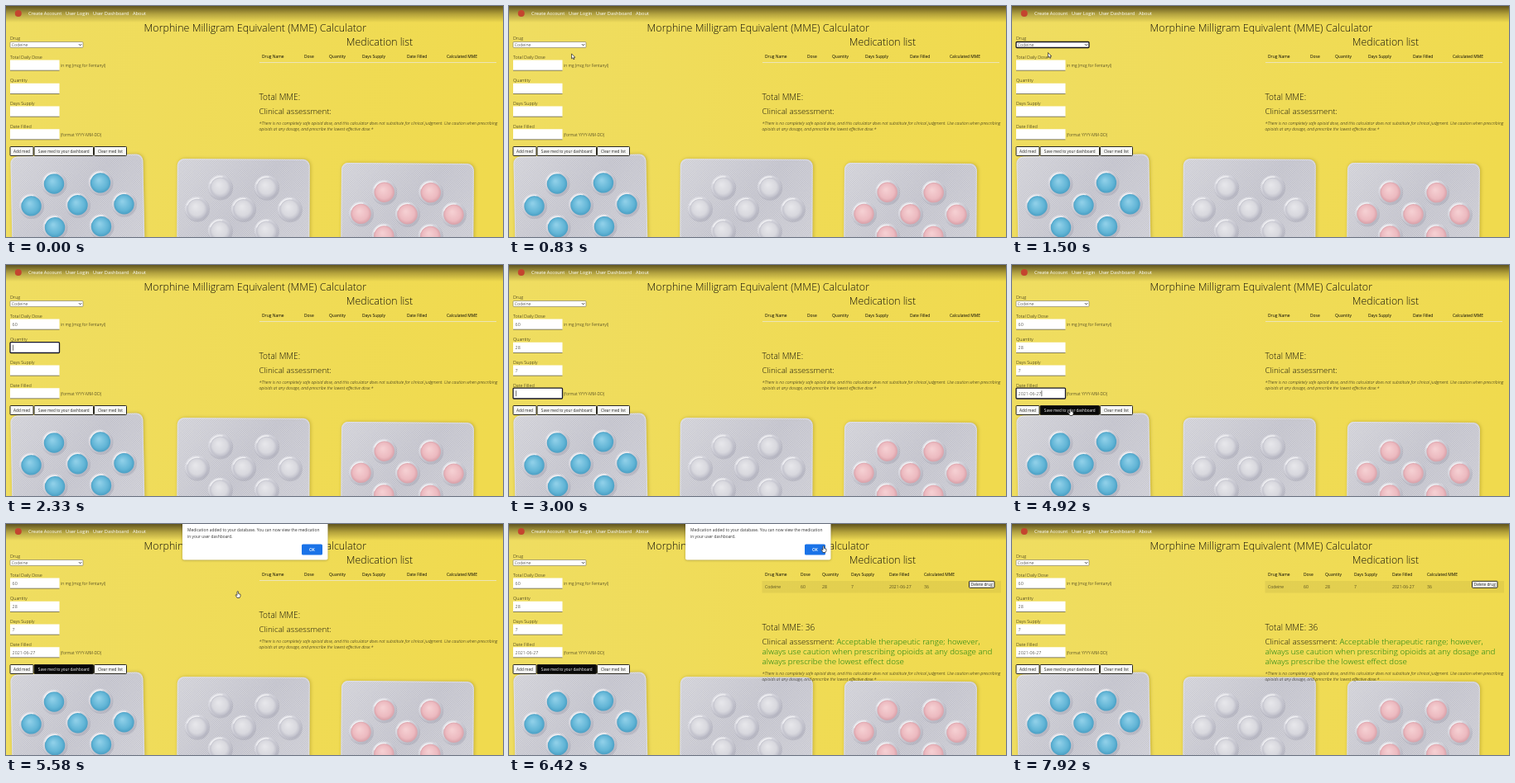
Recreate the animation shown at these times as an HTML page with a canvas. Size 600 px wide and 280 px high, loop 8 s.

```html
<!DOCTYPE html>
<html lang="en">
<head>
<meta charset="utf-8">
<title>MME calculator demo</title>
<style>
html, body { margin: 0; width: 100%; height: 100%; overflow: hidden; background: #efdb56; }
canvas { display: block; width: 600px; height: 280px; }
</style>
</head>
<body>
<canvas id="stage" width="600" height="280"></canvas>
<script>
const LOOP = 8000, W = 600, H = 280;
const stage = document.getElementById('stage').getContext('2d');
let g = stage;

const SANS = '"Open Sans", "Noto Sans", sans-serif';
const INK = '#14120a';

// Type is set ten times larger and scaled down, so small sizes keep exact spacing.
function text(str, x, y, size, { color = INK, weight = 300, align = 'left', italic = '' } = {}) {
  g.save();
  g.translate(x, y);
  g.scale(0.1, 0.1);
  g.font = `${italic} ${weight} ${size * 10}px ${SANS}`;
  g.fillStyle = color;
  g.textAlign = align;
  g.fillText(str, 0, 0);
  const width = g.measureText(str).width / 10;
  g.restore();
  return width;
}

function box(x, y, w, h, fill, stroke, line = 1, radius = 0) {
  g.beginPath();
  g.roundRect(x, y, w, h, radius);
  if (fill) { g.fillStyle = fill; g.fill(); }
  if (stroke) { g.strokeStyle = stroke; g.lineWidth = line; g.stroke(); }
}

function disc(x, y, r, fill) {
  g.beginPath();
  g.arc(x, y, r, 0, 7);
  g.fillStyle = fill;
  g.fill();
}

function linear(x0, y0, x1, y1, ...colors) {
  const grad = g.createLinearGradient(x0, y0, x1, y1);
  colors.forEach((c, i) => grad.addColorStop(i / (colors.length - 1), c));
  return grad;
}

function pill(x, y, [light, mid, dark]) {
  disc(x + 0.5, y + 1, 15, 'rgba(90,90,115,.15)');
  disc(x, y, 14.6, linear(x - 10, y - 12, x + 10, y + 12, '#e2e2e8', '#c9c9d2', '#b4b4c0'));
  const body = g.createRadialGradient(x - 2, y - 3, 1, x, y, 12.5);
  body.addColorStop(0, light);
  body.addColorStop(0.7, mid);
  body.addColorStop(1, dark);
  disc(x, y + 0.3, 12.2, body);
  g.lineCap = 'round';
  g.lineWidth = 1.2;
  g.strokeStyle = 'rgba(255,255,255,.65)';
  g.beginPath();
  g.arc(x, y, 12.6, 3.5, 4.9);
  g.stroke();
}

function blister(cx, cy, top, tilt, colors) {
  g.save();
  g.translate(cx, cy);
  g.rotate(tilt);
  g.shadowColor = 'rgba(110,90,0,.35)';
  g.shadowBlur = 4;
  g.shadowOffsetX = 1;
  box(-80, top, 160, 150, linear(-80, top, 80, 60, '#d6d6dc', '#c6c6cf', '#d2d2d9'), null, 0, 8);
  g.shadowColor = 'transparent';
  g.save();
  g.clip();
  g.lineWidth = 0.7;
  for (let x = -180; x < 180; x += 2.6) {
    g.strokeStyle = 'rgba(255,255,255,.32)';
    g.beginPath(); g.moveTo(x, top); g.lineTo(x + 100, top + 100); g.stroke();
    g.strokeStyle = 'rgba(110,110,130,.18)';
    g.beginPath(); g.moveTo(x, top); g.lineTo(x - 100, top + 100); g.stroke();
  }
  g.restore();
  box(-79.4, top + 0.6, 158.8, 150, null, 'rgba(235,235,240,.6)', 1, 8);
  for (const [col, row] of [[-1, -1], [1, -1], [-2, 0], [0, 0], [2, 0], [-1, 1], [1, 1]])
    pill(col * 28, row * 26.4, colors);
  g.restore();
}

function makeBackdrop() {
  const canvas = document.createElement('canvas');
  canvas.width = W;
  canvas.height = H;
  g = canvas.getContext('2d');
  g.fillStyle = linear(0, 0, W, 120, '#efdd61', '#f0da4e');
  g.fillRect(0, 0, W, H);
  blister(86.5, 241, -60, -0.02, ['#8ecfe8', '#62b5d6', '#4a9fc4']);
  blister(286.5, 246, -60.5, 0.005, ['#e6e6ea', '#d8d8de', '#bfbfca']);
  blister(484.5, 252, -61.5, 0.008, ['#f5cfd2', '#ecbac0', '#d9a0a8']);
  g.fillStyle = linear(0, 0, 0, 20, 'rgba(45,35,8,.74)', 'rgba(60,48,10,.33)', 'rgba(60,48,10,0)');
  g.fillRect(0, 0, W, 20);
  g = stage;
  return canvas;
}

const backdrop = makeBackdrop();

// Each field shows the characters whose key times have passed.
const fields = [
  { label: 'Total Daily Dose', y: 65.5, note: 'in mg (mcg for Fentanyl)', value: '60', start: 1900, step: 110, focus: [1720, 2200] },
  { label: 'Quantity', y: 93.7, value: '28', start: 2340, step: 110, focus: [2200, 2600] },
  { label: 'Days Supply', y: 121.5, value: '7', start: 2740, step: 110, focus: [2600, 2900] },
  { label: 'Date Filled', y: 149.2, note: '(format YYYY-MM-DD)', value: '2021-06-27', start: 3100, step: 130, focus: [2900, 5250] }
];
const SAVE_HOVER = 4900, DIALOG_OPEN = 5300, ROW_ADDED = 5960, DIALOG_CLOSE = 6620;

const within = (t, a, b) => t >= a && t < b;

function drawField({ label, y, note, value, start, step, focus }, t) {
  text(label, 5, y - 1.6, 5.45);
  const count = t < start ? 0 : Math.floor((t - start) / step) + 1;
  const focused = within(t, ...focus);
  box(5, y, 59.5, 12.8, '#fff', focused && '#16162a', 1.3, focused ? 1 : 0);
  if (!focused) box(5, y + 12.2, 59.5, 0.8, '#5c573c');
  const width = text(value.slice(0, count), 7.6, y + 8.4, 5.3);
  if (focused && (t - focus[0]) % 1000 < 500) box(8 + width, y + 3, 0.6, 7, '#111');
  if (note) text(note, 66, y + 8.4, 5.05);
}

function button(label, x, y, w, h, size, fill = '#f7f7f5', color = '#222') {
  box(x, y, w, h, fill, '#2a281e', 1, 0.8);
  text(label, x + w / 2, y + h / 2 + size * 0.36, size, { color, weight: 400, align: 'center' });
}

function drawForm(t) {
  text('Drug', 5, 41.3, 5.45);
  const focused = within(t, 1000, 1720);
  box(5, 43.5, 88, 7, '#fff', focused ? '#15151f' : '#77735c', focused ? 1.3 : 0.6, 1);
  text('Codeine', 6.8, 49, 5.3);
  g.strokeStyle = '#222';
  g.lineWidth = 0.9;
  g.beginPath();
  g.moveTo(88, 46.2); g.lineTo(89.6, 47.8); g.lineTo(91.2, 46.2);
  g.stroke();
  fields.forEach(f => drawField(f, t));
  const hover = within(t, SAVE_HOVER, DIALOG_CLOSE);
  button('Add med', 5, 170.5, 28, 11, 4.7);
  button('Save med to your dashboard', 34, 170.5, 71.5, 11, 4.6, hover ? '#080808' : undefined, hover ? '#fff' : undefined);
  button('Clear med list', 106.5, 170.5, 39, 11, 4.7);
}

const headings = ['Drug Name', 'Dose', 'Quantity', 'Days Supply', 'Date Filled', 'Calculated MME'];
const emptyColumns = [309, 360, 390, 430, 484, 532];
const filledColumns = [309, 352, 378, 413, 459, 501];
const row = ['Codeine', '60', '28', '7', '2021-06-27', '36'];

function drawResults(added) {
  const columns = added ? filledColumns : emptyColumns;
  text('Medication list', 451, 48.2, 12.4, { align: 'center' });
  headings.forEach((h, i) => text(h, columns[i], 63, 4.95, { weight: 400, color: '#000' }));
  if (added) {
    box(305.5, 69, 288.5, 14.5, 'rgba(0,0,0,.055)');
    row.forEach((v, i) => text(v, columns[i], 78.3, 5.1));
    button('Delete drug', 555.5, 69.3, 30.5, 8, 4.8);
  } else {
    box(306, 68, 286, 0.9, 'rgba(235,232,215,.75)');
  }
  const y = added ? 129 : 114;
  text('Total MME:' + (added ? ' 36' : ''), 305.5, y, 10.1);
  const width = text('Clinical assessment: ', 305.5, y + 17, 9.8);
  if (added) {
    const green = { color: '#0b7d0b' };
    text('Acceptable therapeutic range; however,', 305.5 + width, y + 17, 9.8, green);
    text('always use caution when prescribing opioids at any dosage and', 305.5, y + 29, 9.8, green);
    text('always prescribe the lowest effect dose', 305.5, y + 41, 9.8, green);
  }
  const noteY = added ? 183 : 144;
  const italic = { italic: 'italic' };
  text('*There is no completely safe opioid dose, and this calculator does not substitute for clinical judgment. Use caution when prescribing', 305.5, noteY, 5.2, italic);
  text('opioids at any dosage, and prescribe the lowest effective dose.*', 305.5, noteY + 7, 5.2, italic);
}

function drawHeader() {
  disc(14.8, 9, 4, '#c4452f');
  const white = { color: '#fff', weight: 400 };
  text('Create Account', 27, 11.2, 5.7, white);
  text('User Login', 72, 11.2, 5.7, white);
  text('User Dashboard', 105, 11.2, 5.7, white);
  text('About', 153, 11.2, 5.7, white);
  text('Morphine Milligram Equivalent (MME) Calculator', 300.8, 31, 12.5, { align: 'center' });
}

function drawDialog() {
  g.save();
  g.shadowColor = 'rgba(0,0,0,.3)';
  g.shadowBlur = 3;
  g.shadowOffsetY = 0.5;
  box(213, -4, 175.5, 47.5, '#fff', null, 0, 2);
  g.restore();
  const style = { weight: 400, color: '#333' };
  text('Medication added to your database. You can now view the medication', 219, 9.1, 4.9, style);
  text('in your user dashboard.', 219, 16.8, 4.9, style);
  box(357, 24.5, 25, 13, '#1a73e8', null, 0, 1.6);
  text('OK', 369.5, 32.8, 4.9, { weight: 600, color: '#fff', align: 'center' });
}

// Pointer stops: time, x, y.
const approach = [[500, 150, 110], [950, 60, 47], [1250, 55, 47], [1500, 43.5, 56.5], [1720, 36, 71]];
const toDialog = [[4450, 40, 156], [4900, 70, 175], [5300, 72, 176], [5580, 279, 82], [5900, 372, 32], [6420, 379, 27], [6700, 379, 27]];

function pointerAt(path, t) {
  const i = path.findIndex(stop => stop[0] > t);
  if (i < 1) return null;
  const [t0, x0, y0] = path[i - 1], [t1, x1, y1] = path[i];
  const p = (t - t0) / (t1 - t0), e = p * p * (3 - 2 * p);
  return [x0 + (x1 - x0) * e, y0 + (y1 - y0) * e];
}

function drawPointer(t) {
  const at = pointerAt(approach, t) || pointerAt(toDialog, t);
  if (!at) return;
  const shape = t >= SAVE_HOVER
    ? 'M0 0Q1-1 1.6 0V2.6L4 3.2V5.5L3 7.5H0L-2 4.2L-1.2 3.6L0 4.6Z'
    : 'M0 0V6L1.4 4.8L2.4 6.9L3.4 6.4L2.5 4.4H4.3Z';
  const path = new Path2D(shape);
  g.save();
  g.translate(...at);
  g.fillStyle = '#fff';
  g.strokeStyle = '#222';
  g.lineWidth = 0.7;
  g.fill(path);
  g.stroke(path);
  g.restore();
}

function draw(t) {
  g.drawImage(backdrop, 0, 0);
  drawHeader();
  drawForm(t);
  drawResults(t >= ROW_ADDED);
  if (within(t, DIALOG_OPEN, DIALOG_CLOSE)) drawDialog();
  drawPointer(t);
}

const begin = performance.now();
function tick() {
  draw((performance.now() - begin) % LOOP);
  requestAnimationFrame(tick);
}
tick();
</script>
</body>
</html>
```
